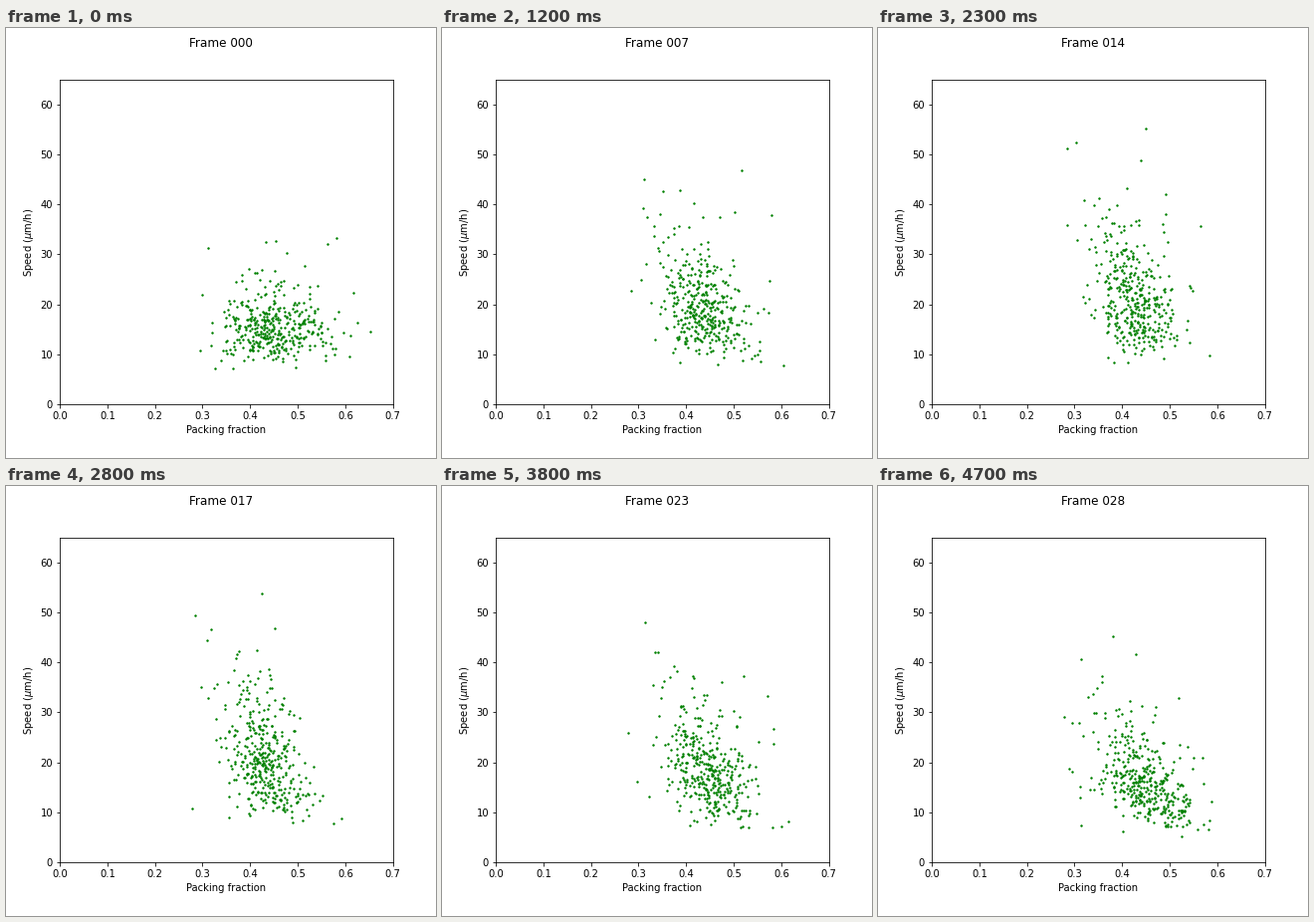
A matplotlib script for the animation above (4800 ms loop, 432 px wide and 432 px high).

```python
import matplotlib.pyplot as plt
import numpy as np
from matplotlib.animation import FuncAnimation

STEPS, CELLS = 29, 395
TICKS, TICK_MS = 48, 100
MEMORY = 0.6  # how much of a cell's state survives one step

rng = np.random.default_rng(12)

# Most cells stay near the core, a few wander far from it.
reach = np.where(rng.random((CELLS, 1)) < 0.15, 1.7, 0.8)


def soft_limit(z, bound):
    return bound * np.tanh(z / bound)


def latent_states():
    """Yield unit-variance noise that drifts from step to step."""
    state = rng.standard_normal((CELLS, 2))
    for _ in range(STEPS):
        yield reach * state
        kick = rng.standard_normal((CELLS, 2))
        state = MEMORY * state + np.sqrt(1 - MEMORY**2) * kick


def cloud(step, state):
    """Packing fraction and speed: the cloud rises, thins out and sinks back."""
    t = step / (STEPS - 1)
    u, v = state.T
    corr = -0.12 - 0.35 * np.sqrt(t)
    w = corr * u + np.sqrt(1 - corr**2) * v

    mean = 0.433 + 0.010 * np.cos(2 * np.pi * t)
    width = 0.052 + 0.010 * (2 * t - 1) ** 2
    median = 15.5 + 5 * np.sin(np.pi * t)
    spread = 0.33 + 0.10 * np.sqrt(t)

    fraction = mean + width * soft_limit(u, 3.6)
    speed = median * np.exp(spread * soft_limit(w, 2.6))
    return np.column_stack([fraction, speed])


positions = [cloud(k, state) for k, state in enumerate(latent_states())]

fig = plt.figure(figsize=(6, 6), dpi=72, facecolor="white")
ax = fig.add_axes([0.125, 0.125, 0.775, 0.755])
ax.set(xlim=(0, 0.7), ylim=(0, 65),
       xlabel="Packing fraction", ylabel=r"Speed ($\mu$m/h)")
title = fig.suptitle("Frame 000", fontsize=12)
dots = ax.scatter(*positions[0].T, s=2, color="green")


def update(tick):
    step = (2 * tick + 1) * 3 // 10  # six steps per second, on 100 ms ticks
    title.set_text(f"Frame {step:03d}")
    dots.set_offsets(positions[step])
    return title, dots


anim = FuncAnimation(fig, update, frames=TICKS, interval=TICK_MS, repeat=True)
plt.show()
```
